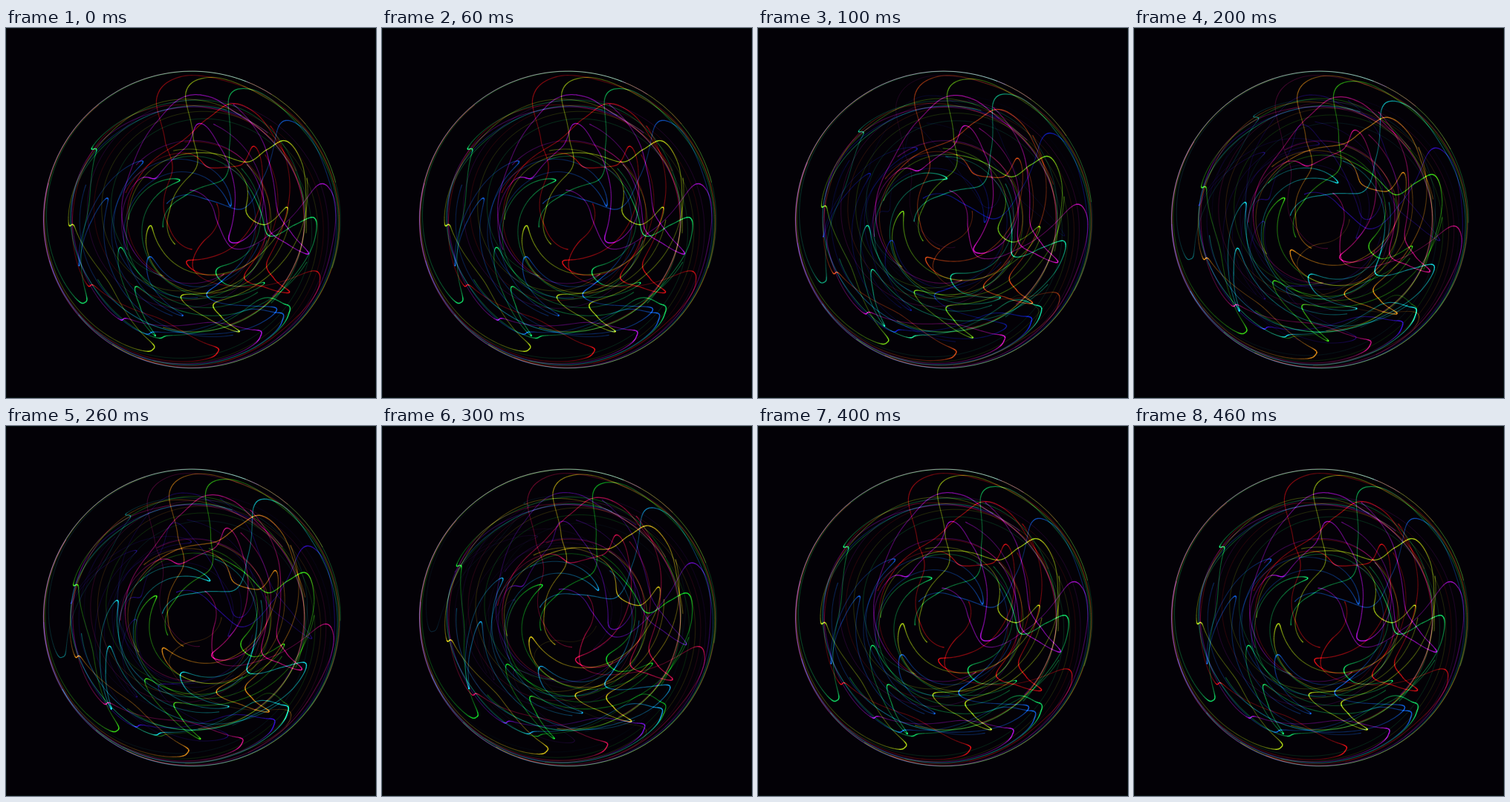
An HTML page with a canvas for the animation above (0.5 s loop, 498x498 px).

```html
<!DOCTYPE html>
<html>
<head>
<meta charset="utf-8">
<style>
html, body { margin: 0; width: 100%; height: 100%; overflow: hidden; background: #030106; }
canvas { display: block; }
</style>
</head>
<body>
<canvas id="stage" width="498" height="498"></canvas>
<script>
const ctx = document.getElementById("stage").getContext("2d");
const center = { x: 250, y: 258 }, rim = 201;

// A strand is a smooth line through [radius, angle] nodes. Its copies are
// generations of one swirl: each generation is turned further, faster near
// the core, and its hue is a fifth of the wheel on.
// spin, core: turn per generation is spin / (radius + core) degrees
// bend: speed-up per generation; hue: fifth of the wheel at generation 0
const strands = [
  { spin: 4300, core: 0, bend: 4, hue: 0, from: -4, to: 2, // kinks on the left
    nodes: [[155, 335], [152, 282], [163, 232], [160, 187], [166, 150], [157, 144], [140, 108],
            [170, 82], [182, 79], [190, 88], [196, 125], [199, 180], [200, 250], [200, 320]] },
  { spin: 5800, core: 0, bend: 5, hue: 1, from: -3, to: 2, // zigzag hooks below
    nodes: [[165, -20], [142, 14], [124, 44], [116, 74], [137, 73], [164, 67], [134, 81],
            [104, 98], [101, 74], [107, 28], [105, -45]] },
  { spin: 6200, core: 100, bend: 3.2, hue: 2, from: -3, to: 3, // arches over the rim
    nodes: [[40, 165], [33, 252], [63, 306], [112, 297], [170, 287], [193, 295], [192, 318],
            [196, 348], [199, 390], [200, 440], [199, 500]] },
  { spin: 5800, core: 0, bend: 4, hue: 1, from: -3, to: 2, // humps at the upper right
    nodes: [[85, 180], [88, 255], [94, 289], [106, 313], [138, 317], [165, 320], [167, 332],
            [155, 353], [151, 383], [152, 416], [150, 465]] },
  { spin: 7900, core: 45, bend: 3, hue: 1, from: -3, to: 2, // curls around the core
    nodes: [[132, 0], [112, 50], [90, 107], [68, 155], [55, 171], [58, 131], [77, 74],
            [104, 26], [130, -7], [97, 4], [74, -8], [90, -40], [96, -105]] },
  { spin: 5000, core: 0, bend: 0, hue: 0, from: -2, to: 2, dim: 0.6, // loose spiral arms
    nodes: Array.from({ length: 9 }, (_, i) => [85 + 14 * i, 55 * i]) }
];

const spline = (a, b, c, d, t) =>
  b + t / 2 * (c - a + t * (2 * a - 5 * b + 4 * c - d + t * (3 * (b - c) + d - a)));

// Catmull-Rom through one coordinate of the nodes, clamped at both ends.
function along(nodes, axis, i, t) {
  const at = n => nodes[Math.max(0, Math.min(nodes.length - 1, n))][axis];
  return spline(at(i - 1), at(i), at(i + 1), at(i + 2), t);
}

function pointOn(nodes, i, t) {
  const radius = Math.min(rim, along(nodes, 0, i, t));
  const angle = along(nodes, 1, i, t) * Math.PI / 180;
  return [center.x + radius * Math.cos(angle), center.y + radius * Math.sin(angle)];
}

// Lines glow where the curve parameter moves slowly.
function drawLine(nodes, hue, strength) {
  const steps = 16;
  let [x, y] = pointOn(nodes, 0, 0);
  for (let n = 1; n <= (nodes.length - 1) * steps; n++) {
    const i = Math.floor((n - 1) / steps);
    const [nx, ny] = pointOn(nodes, i, n / steps - i);
    const glow = strength * Math.min(0.85, 0.16 + 1 / Math.hypot(nx - x, ny - y));
    ctx.strokeStyle = `hsla(${hue}, 90%, 50%, ${glow})`;
    ctx.lineWidth = 0.8 + 0.8 * glow;
    ctx.beginPath();
    ctx.moveTo(x, y);
    ctx.lineTo(nx, ny);
    ctx.stroke();
    [x, y] = [nx, ny];
  }
}

function drawStrand({ spin, core, bend, hue, from, to, dim = 1, nodes }, phase) {
  for (let k = from; k <= to; k++) {
    const age = k + phase;
    const turned = nodes.map(([radius, angle]) =>
      [radius, angle + age * spin / (radius + core) + bend * age * age]);
    const fade = Math.min(1, age - from, to + 1 - age);
    drawLine(turned, 72 * (hue + age), dim * fade);
  }
}

function draw(phase) {
  ctx.globalCompositeOperation = "source-over";
  ctx.fillStyle = "#030106";
  ctx.fillRect(0, 0, 498, 498);
  ctx.lineWidth = 1;
  ctx.strokeStyle = "#071312";
  ctx.strokeRect(0.5, 0.5, 497, 497);
  ctx.globalCompositeOperation = "lighter";
  for (const strand of strands) drawStrand(strand, phase);
}

// Four poses per cycle; the fifth beat repeats the first.
let shown = -1;
function tick() {
  const pose = Math.floor(performance.now() % 500 / 100) % 4;
  if (pose !== shown) draw((shown = pose) / 4);
  requestAnimationFrame(tick);
}
tick();
</script>
</body>
</html>
```
